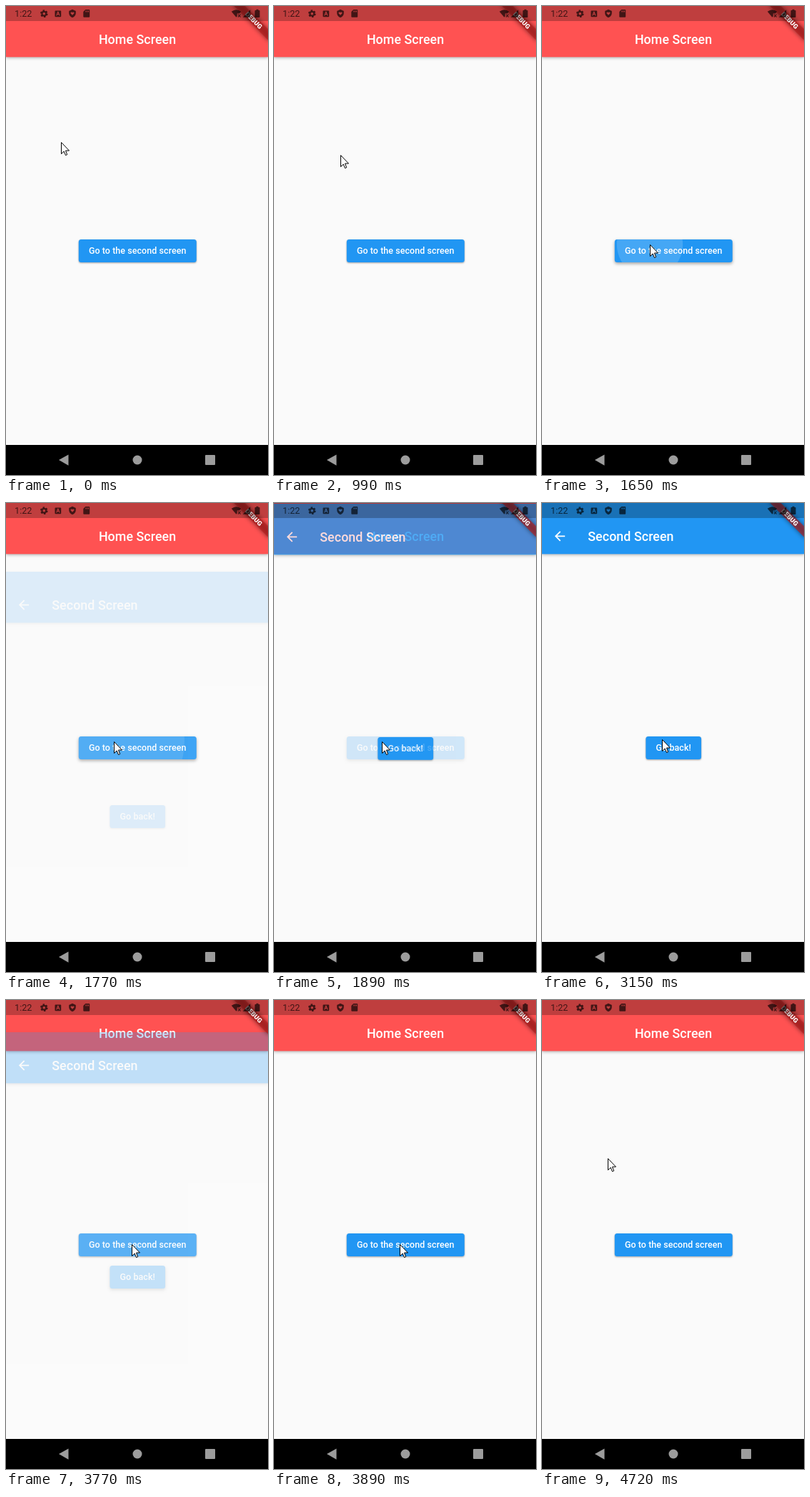
An HTML page for the animation above (5.78 s loop, 367x655 px).

```html
<!DOCTYPE html>
<html lang="en">
<head>
<meta charset="utf-8">
<title>Screen navigation</title>
<style>
  html, body { margin: 0; width: 100%; height: 100%; overflow: hidden; background: #fafafa; }
  svg { display: block; width: 100%; height: 100%; }
  text { font-family: Roboto, sans-serif; font-weight: 500; fill: #fff; }
  .title { font-size: 17.86px; letter-spacing: .04px; }
  .label { font-size: 12.5px; letter-spacing: .05px; text-anchor: middle; }
  .bar { filter: drop-shadow(0 1.5px 2px rgba(0, 0, 0, .32)); }
  .button { filter: drop-shadow(0 1px 1px rgba(0, 0, 0, .35)); }
  .button.pressed { filter: drop-shadow(0 2px 2px rgba(0, 0, 0, .35)); }
  .shade { filter: blur(3.5px); }
</style>
</head>
<body>
<svg viewBox="0 0 367 655">
  <defs>
    <clipPath id="homeClip"><rect x="101.8" y="326" width="165" height="32" rx="3.5"/></clipPath>
    <clipPath id="secondClip"><rect x="145.4" y="326" width="77.700" height="32" rx="3.5"/></clipPath>
  </defs>

  <g id="home">
    <rect width="367" height="655" fill="#fafafa"/>
    <rect class="bar" width="367" height="71.3" fill="#ff5252"/>
    <text class="title" x="184" y="53" text-anchor="middle">Home Screen</text>
    <rect class="button" id="homeButton" x="101.8" y="326" width="165" height="32" rx="3.5" fill="#2196f3"/>
    <g clip-path="url(#homeClip)"><circle id="homeRipple" cx="151" cy="333" fill="#fff"/></g>
    <text class="label" x="184.2" y="346.4">Go to the second screen</text>
  </g>

  <g id="second">
    <rect width="367" height="655" fill="#fafafa"/>
    <rect class="bar" width="367" height="71.3" fill="#2196f3"/>
    <path transform="translate(14.3 35.6) scale(.893)" fill="#fff"
      d="M20 11H7.83l5.59-5.59L12 4l-8 8 8 8 1.41-1.41L7.83 13H20z"/>
    <text class="title" x="64.3" y="53">Second Screen</text>
    <rect class="button" id="secondButton" x="145.4" y="326" width="77.7" height="32" rx="3.5" fill="#2196f3"/>
    <g clip-path="url(#secondClip)"><circle id="secondRipple" cx="176" cy="341" fill="#fff"/></g>
    <text class="label" x="184.2" y="346.4">Go back!</text>
  </g>

  <g transform="translate(368.5 -1.5) rotate(45) scale(.893)">
    <rect class="shade" x="-40" y="28" width="80" height="12" fill-opacity=".5"/>
    <rect x="-40" y="28" width="80" height="12" fill="#b71c1c" fill-opacity=".63"/>
    <text y="37.6" text-anchor="middle" style="font-size:10.2px;font-weight:900">DEBUG</text>
  </g>

  <rect width="367" height="21" fill-opacity=".25"/>
  <g fill-opacity=".66" fill-rule="evenodd">
    <text x="12" y="15.4" style="font-size:12.7px;font-weight:400;fill:#000">1:22</text>
    <g fill="none" stroke="#000" stroke-opacity=".66">
      <circle cx="53.3" cy="10.7" r="2.9" stroke-width="2.2"/>
      <circle cx="53.3" cy="10.7" r="4.6" stroke-width="1.5" stroke-dasharray="2.6 2.217"/>
    </g>
    <path d="M69.500 6.400h6.700q1 0 1 1v6.800q0 1-1 1h-6.700q-1 0-1-1V7.400q0-1 1-1zM70.200 13.500h1.200l.5-1.400h2l.5 1.400h1.200L73.400 7.800h-1.200zM72.200 11.100l.6-1.800.6 1.800z"/>
    <path d="M93 4.800l4.800 2.100v3.200c0 3-2 5.200-4.800 6.100c-2.800-.9-4.800-3.100-4.800-6.100V6.900zM93 12.800l2.400-2.500q.6-1.600-.9-1.900q-1 0-1.500.8q-.5-.8-1.500-.8q-1.500.3-.9 1.900z"/>
    <path d="M111.300 5h4.900q1 0 1 1v8.700q0 1-1 1h-6.900q-1 0-1-1V8zM111.300 6.600v2h1v-2zM113.200 6.600v2h1v-2zM115 6.600v2h1v-2z"/>
    <path d="M315.800 7.700Q322.500 2.700 329.200 7.700L326.800 10.500H323.800V14.300L322.500 15.800z"/>
    <path d="M324.900 11.700l3.600 3.800M328.500 11.700l-3.600 3.800" stroke="#000" stroke-opacity=".66" stroke-width="1.1"/>
    <path d="M331.800 15.800L342.200 5.300V15.800z"/>
    <path d="M350.500 5.900V4.800h3V5.900h1.300q.7 0 .7.7v8.700q0 .7-.7.7h-5.600q-.7 0-.7-.7V6.600q0-.7.7-.7z"/>
  </g>

  <rect y="612" width="367" height="1" fill="#fff"/>
  <rect y="613" width="367" height="42"/>
  <g fill="#9c9c9c">
    <path d="M74 634L87.500 626.500V641.800z"/>
    <circle cx="184" cy="634" r="6.500"/>
    <rect x="279" y="627" width="14" height="14" rx="1"/>
  </g>

  <path id="cursor" d="M.5 .5V16.500L4.200 13L6.500 18.500L8.700 17.600L6.500 12H11.500z"
    fill="#fff" stroke="#000" stroke-width="1" stroke-linejoin="round"/>
</svg>
<script>
const LOOP = 5780;
const BEAT = 125;
const SLIDE = 153;   // a quarter of the page height
const PACE = .57;    // share of a page transition per beat
const PUSH = 1640, POP = 3515;
const $ = id => document.getElementById(id);
const clamp = v => Math.min(1, Math.max(0, v));
const beats = (t, start) => Math.floor((t - start) / BEAT);

// Pointer moves, each from where the last one ended
const moves = [
  { start: 985, steps: 1, x: 93, y: 208 },
  { start: 1110, steps: 1, x: 136, y: 266 },
  { start: 1240, steps: 3, x: 151, y: 333 },
  { start: 2350, steps: 3, x: 147, y: 268 },
  { start: 3145, steps: 1, x: 168, y: 330 },
  { start: 3265, steps: 2, x: 176, y: 341 },
  { start: 4190, steps: 5, x: 92, y: 221 }
];

function pointer(t) {
  let x = 77, y = 190;
  for (const move of moves) {
    const rest = 1 - clamp((beats(t, move.start) + 1) / move.steps);
    const k = 1 - rest * rest;
    x += (move.x - x) * k;
    y += (move.y - y) * k;
  }
  return [Math.round(x), Math.round(y)];
}

function bezier(x1, y1, x2, y2) {
  const axis = (a, b, s) => 3 * (1 - s) * s * ((1 - s) * a + s * b) + s ** 3;
  return x => {
    let lo = 0, hi = 1;
    for (let i = 0; i < 24; i++) {
      const mid = (lo + hi) / 2;
      if (axis(x1, x2, mid) < x) lo = mid; else hi = mid;
    }
    return axis(y1, y2, hi);
  };
}
const slideEase = bezier(.4, 0, .2, 1);
const fadeEase = bezier(.42, 0, 1, 1);

// The page starts to move a short lag after the tap
const transition = (t, start, lag) => clamp((beats(t, start) - lag) * PACE);

function tap(name, width, t, start) {
  const n = beats(t, start);
  const active = n >= 0 && n < 3;
  const ripple = $(name + 'Ripple');
  ripple.setAttribute('r', active ? width * (.28 + .32 * n) : 0);
  ripple.setAttribute('fill-opacity', .16 - .05 * n);
  $(name + 'Button').classList.toggle('pressed', active);
}

function render(t) {
  $('cursor').setAttribute('transform', `translate(${pointer(t)})`);

  const shown = transition(t, PUSH, .47) - transition(t, POP, 1.035);
  const second = $('second');
  second.setAttribute('display', shown > 0 ? 'inline' : 'none');
  second.setAttribute('transform', `translate(0 ${Math.round(SLIDE * (1 - slideEase(shown)))})`);
  second.setAttribute('opacity', fadeEase(shown));

  tap('home', 165, t, PUSH);
  tap('second', 78, t, POP);
}

const start = performance.now();
function frame() {
  render((performance.now() - start) % LOOP);
  requestAnimationFrame(frame);
}
frame();
</script>
</body>
</html>
```
